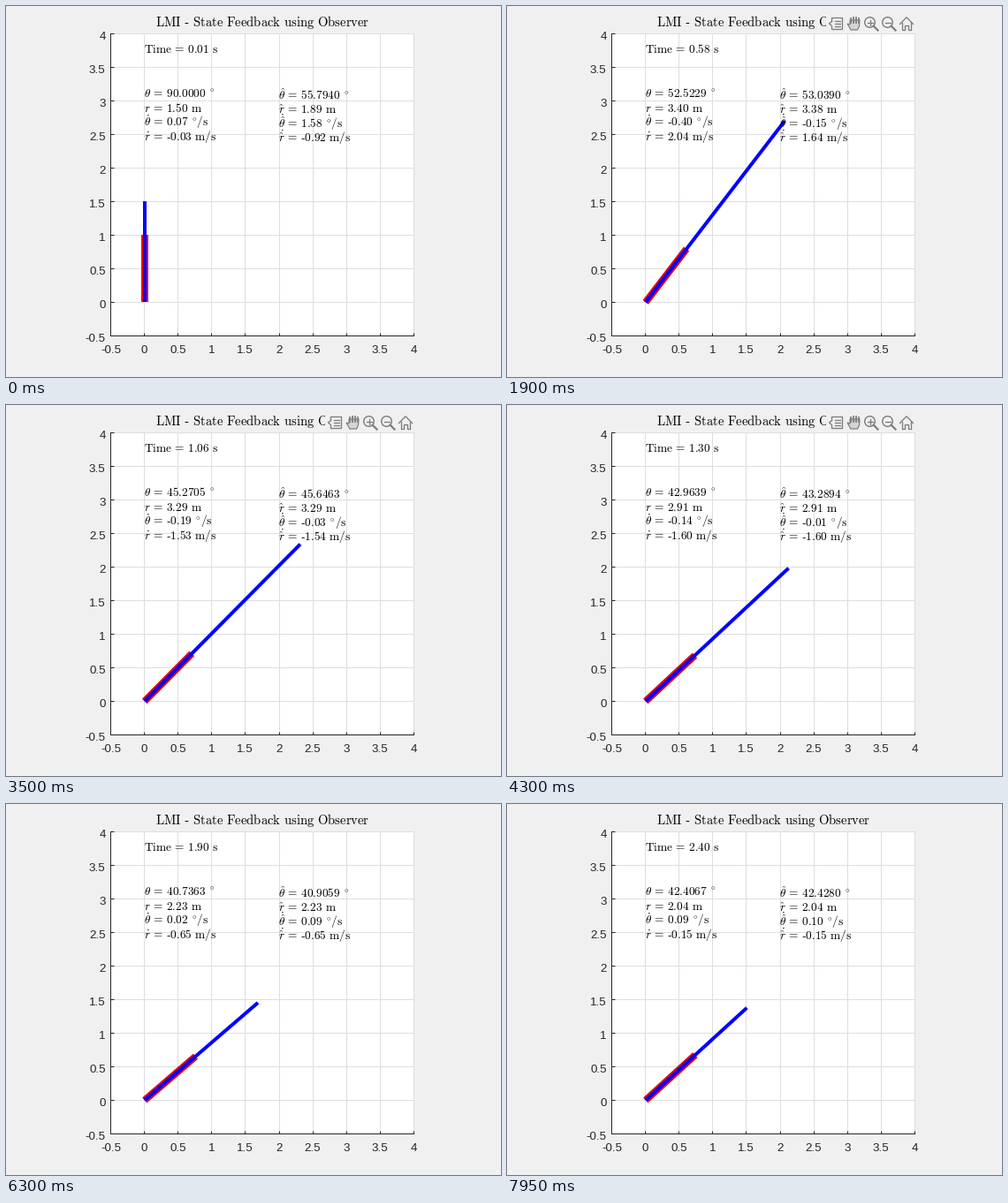
Recreate the animation shown at these times as a matplotlib script. Size 560 px wide and 420 px high, loop 8000 ms.

```python
import numpy as np
import matplotlib.pyplot as plt
from matplotlib.animation import FuncAnimation
from matplotlib.patches import Circle, Polygon, Rectangle
from matplotlib.transforms import Affine2D

W, H, FRAMES, STEP = 560, 420, 160, 50
PT = 0.72                 # points per pixel at 100 dpi
LEFT, TOP, SIZE = 118.35, 31.1, 342.3
GAP = SIZE / 9            # half a unit, one grid step
BACK, DARK, ICON = "#f0f0f0", "#262626", "#7d7d7d"
HYPHEN = "\u2010"
SPACE = r"\hspace{0.38}"
EQUALS = r"\hspace{0.18}=\hspace{0.18}"

plt.rcParams["font.family"] = "Liberation Sans"
plt.rcParams["mathtext.fontset"] = "cm"

# Key poses: time, angle (deg), radius, angular speed (rad/s), radial speed
POSES = [
    (0.010, 90.0000, 1.50, 0.07, -0.03),
    (0.190, 76.1524, 1.73, -2.20, 3.81),
    (0.580, 52.5229, 3.40, -0.40, 2.04),
    (1.060, 45.2705, 3.29, -0.19, -1.53),
    (1.555, 41.3147, 2.54, -0.08, -1.20),
    (2.395, 42.4067, 2.04, 0.09, -0.15),
]


def ease(u, h, y0, y1, m0, m1):
    """Cubic between two values with given end slopes: value and slope."""
    a, b, d = h * m0, h * m1, y1 - y0
    c2, c3 = 3 * d - 2 * a - b, a + b - 2 * d
    return y0 + u * (a + u * (c2 + u * c3)), (a + u * (2 * c2 + 3 * u * c3)) / h


def arm_state(t):
    i = max(k for k in range(len(POSES) - 1) if k == 0 or POSES[k][0] <= t + 1e-9)
    (t0, q0, r0, w0, v0), (t1, q1, r1, w1, v1) = POSES[i:i + 2]
    h = t1 - t0
    u = (t - t0) / h
    angle, spin = ease(u, h, q0, q1, np.degrees(w0), np.degrees(w1))
    radius, speed = ease(u, h, r0, r1, v0, v1)
    return [angle, radius, np.radians(spin), speed]


def observer_error(t):
    """Critically damped start-up error plus a slow drift in the angle."""
    s = t - 0.01

    def fade(rate, a, b):
        return np.exp(-rate * s) * (a + b * s)

    drift = np.cos(0.64 * s)
    return [fade(14, -34.686, 408) + 0.48 * drift,
            fade(8.5, 0.39, -6),
            fade(5.2, 1.31, 0) + 0.2 * drift,
            fade(8.5, -0.89, -88.5)]


fig = plt.figure(figsize=(5.6, 4.2), dpi=100, facecolor=BACK)


def label(x, y, text, size=13.33, **style):
    return fig.text(x / W, 1 - y / H, text, fontsize=size * PT,
                    va="baseline", zorder=3, **style)


# Plot area
ax = fig.add_axes([LEFT / W, 1 - (TOP + SIZE) / H, SIZE / W, SIZE / H])
ax.set(xlim=(-0.5, 4), ylim=(-0.5, 4))
ticks = np.arange(-0.5, 4.1, 0.5)
ax.set_xticks(ticks, [])
ax.set_yticks(ticks, [])
ax.tick_params(direction="in", length=3.5 * PT, width=PT, color=DARK)
ax.set_axisbelow(True)
ax.grid(color="#dedede", linewidth=PT)
for gridline in ax.get_xgridlines() + ax.get_ygridlines():
    gridline.set_clip_on(False)
for side in ("top", "right"):
    ax.spines[side].set_visible(False)
for side in ("left", "bottom"):
    ax.spines[side].set(color=DARK, linewidth=PT)

for i, v in enumerate(ticks):
    label(LEFT + 0.3 + GAP * i, 392.7, f"{v:g}", ha="center", color=DARK)
    label(112.7, TOP + SIZE + 6.4 - GAP * i, f"{v:g}", ha="right", color=DARK)

words = ["LMI", HYPHEN, "State", "Feedback", "using", "Observer"]
label(289.7, 23, r"$\mathrm{" + SPACE.join(words) + "}$", 14.6, ha="center")


def bar_line(color, width, z):
    nudge = ax.transData + Affine2D().translate(0.4, 0)
    return ax.plot([], [], color=color, lw=width * PT, solid_capstyle="butt",
                   zorder=z, transform=nudge)[0]


sleeve = bar_line("#ee0000", 8, 3)
rod = bar_line("blue", 4, 4)


class Readout:
    """A line of the form 'symbol = number unit'."""

    def __init__(self, x, y, symbol, unit, places=2):
        self.form = "$" + symbol + EQUALS + "%s" + SPACE + unit + "$"
        self.places = places
        self.text = label(x, y, "")

    def show(self, v):
        number = f"{v:.{self.places}f}".replace("-", HYPHEN)
        self.text.set_text(self.form % number)


def column(x, y, angle, radius):
    dot = r"\dot{%s}"
    return [Readout(x, y, angle, r"^{\circ}", 4),
            Readout(x, y + 16, radius, r"\mathrm{m}"),
            Readout(x, y + 32, dot % angle, r"^{\circ}\mathrm{/s}"),
            Readout(x, y + 48, dot % radius, r"\mathrm{m/s}")]


clock = Readout(155.8, 53.3, r"\mathrm{Time}", r"\mathrm{s}")
actual = column(155.8, 104.4, r"\theta", "r")
observed = column(308, 106.4, r"\hat{\theta}", r"\hat{r}")

# Hover toolbar, in stage pixels
bar = fig.add_axes([0, 0, 1, 1], zorder=5)
bar.set(xlim=(0, W), ylim=(H, 0))
bar.axis("off")
bar.add_patch(Rectangle((361, 8), 101, 22.5, color=BACK, lw=0))


def stroke(*points, width=1.3):
    xs, ys = zip(*points)
    bar.plot(xs, ys, color=ICON, lw=width * PT, solid_joinstyle="round")


def lens(x, plus):
    bar.add_patch(Circle((x, 18.5), 5.8, fill=False, ec=ICON, lw=1.4 * PT))
    stroke((x + 4.2, 22.7), (x + 9, 27.5), width=2.2)
    stroke((x - 3, 18.5), (x + 3, 18.5))
    if plus:
        stroke((x, 15.5), (x, 21.5))


def note():
    stroke((367.5, 17.5), (367.5, 13.5), (379.5, 13.5), (379.5, 26.5),
           (367.5, 26.5), (367.5, 22.5), (364.5, 20), (367.5, 17.5))
    for y in (17, 20, 23):
        stroke((370.5, y), (376.5, y))


def hand():
    bar.add_patch(Polygon([(389, 27), (385, 20), (388, 21), (388, 16),
                           (399, 16), (398.5, 23), (396.5, 27)],
                          fc="#d4d4d4", ec=ICON, lw=1.2 * PT))
    for k in range(4):
        stroke((388.5 + 3 * k, 13 + 0.6 * (k - 1.5) ** 2), (388.5 + 3 * k, 19), width=1.8)


def house():
    stroke((444.5, 20.5), (452, 12.8), (459.5, 20.5))
    stroke((447, 19), (447, 27), (450.3, 27), (450.3, 22), (453.7, 22),
           (453.7, 27), (457, 27), (457, 19))


note()
hand()
lens(410.5, True)
lens(430.5, False)
house()


def draw(i):
    t = 0.01 + 0.015 * i
    real = arm_state(t)
    guess = np.add(real, observer_error(t))
    tip = np.exp(1j * np.radians(real[0]))
    for line, length in ((sleeve, 1), (rod, real[1])):
        line.set_data([0, length * tip.real], [0, length * tip.imag])
    clock.show(t + 1e-6)
    for line, v in zip(actual + observed, [*real, *guess]):
        line.show(v)
    bar.set_visible(750 <= i * STEP < 4700)
    return []


anim = FuncAnimation(fig, draw, frames=FRAMES, interval=STEP,
                     repeat=True, repeat_delay=0)
plt.show()
```
